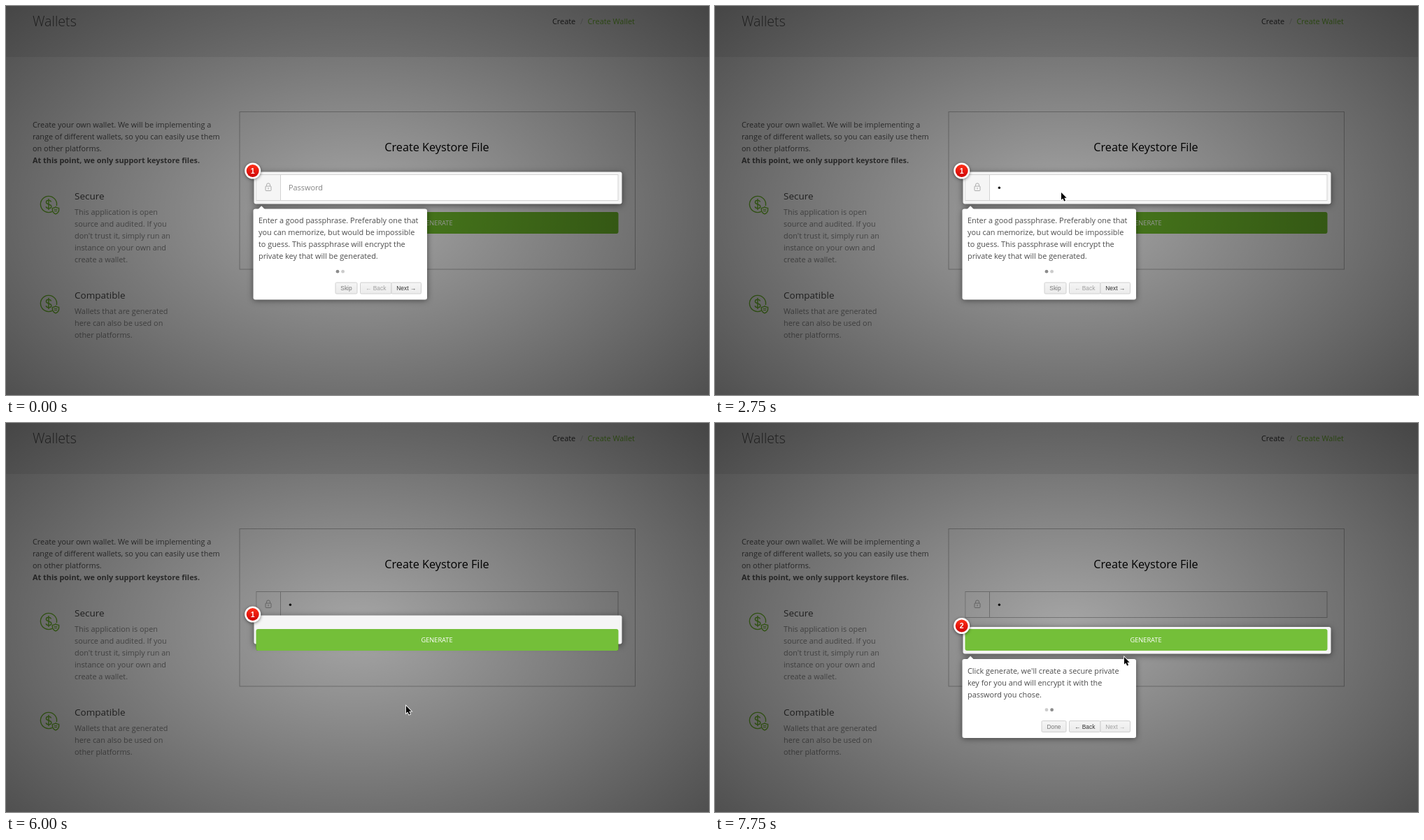
Recreate the animation shown at these times as an HTML page. Size 1005 px wide and 557 px high, loop 8000 ms.

```html
<!DOCTYPE html>
<html lang="en">
<head>
<meta charset="utf-8">
<title>Create Wallet</title>
<style>
  html, body { margin: 0; width: 100%; height: 100%; overflow: hidden; background: #777; }
  svg { display: block; width: 1005px; height: 557px; font-family: "Open Sans", "Noto Sans", sans-serif; }
  .ui { font-family: "Liberation Sans", Arial, sans-serif; }
  .menu { font-family: Inter, Roboto, sans-serif; }
  .glow { filter: drop-shadow(0 2px 5px rgba(0,0,0,.5)); }
  .tip { filter: drop-shadow(0 1px 4px rgba(0,0,0,.5)); }
  .badge { filter: drop-shadow(0 1px 2px rgba(0,0,0,.5)); }
</style>
</head>
<body>
<svg id="stage" viewBox="0 0 1005 557" xmlns="http://www.w3.org/2000/svg"></svg>
<script>
const BODY = 10.88;
const GREEN = '#72c02c';
const stage = document.getElementById('stage');

const text = (x, y, str, size, fill, attrs = '') =>
  `<text x="${x}" y="${y}" font-size="${size}" fill="${fill}" ${attrs}>${str}</text>`;

const lines = (x, y, rows, fill) =>
  rows.map((row, i) => text(x, y + i * 17, row, BODY, fill)).join('');

const rect = (x, y, w, h, fill, attrs = '') =>
  `<rect x="${x}" y="${y}" width="${w}" height="${h}" fill="${fill}" ${attrs}/>`;

const coin = y => `
  <g transform="translate(61 ${y})" fill="none" stroke="${GREEN}" stroke-width="1.4">
    <path d="M5 10.4A11.6 11.6 0 1 1 11.4 2"/>
    <path d="M3.6-3.6C3-5.2 1.6-5.7 0-5.7C-2-5.7-3.6-4.7-3.6-3C-3.6.8 3.8-.8 3.8 2.9C3.8 4.7 2 5.7 0 5.7C-2 5.7-3.4 5-3.9 3.3M0-8V8"/>
    <path d="M5.4 5.4Q8.2 5.4 10 3.8Q11.8 5.4 14.6 5.4V8.6Q14.2 12 10 13.8Q5.8 12 5.4 8.6Z"/>
    <path d="M7.6 7.4H12.4M7.9 9.6H12.1" stroke-width="1"/>
  </g>`;

const field = (border, fill) => `
  ${rect(358, 241.5, 517, 37, '#fff', `stroke="${border}"`)}
  ${rect(358.5, 242, 34, 36, fill)}
  <path d="M392.5 242V278" stroke="${border}"/>
  <g fill="none" stroke="#aaa">
    <path d="M372.5 258V256.3A2.5 2.5 0 0 1 377.5 256.3V258"/>
    <rect x="371" y="258" width="8" height="6.5" rx=".8"/>
    <path d="M375 260V262.5"/>
  </g>
  <g class="hint">${text(404, 264, 'Password', BODY, '#858585')}</g>
  <circle class="dot" cx="406.4" cy="260.3" r="1.7" fill="#111"/>`;

const button = cls => `
  ${rect(357.5, 295, 518, 31, GREEN, `rx="3" class="${cls}"`)}
  ${text(616, 313.6, 'GENERATE', 9.25, '#fff', 'text-anchor="middle"')}`;

const control = (x, y, w, label, fill, id = '') =>
  rect(x, y, w, 16, 'url(#btn)', `stroke="#d0d0d0" rx="1.5" ${id && `id="${id}-box"`}`) +
  text(x + w / 2, y + 11, label, 8.4, fill, `class="ui" text-anchor="middle" ${id && `id="${id}"`}`);

const page = `
  ${rect(0, 0, 1005, 557, '#fff')}
  ${rect(0, 0, 1005, 73, '#ececec')}
  ${text(38, 29, 'Wallets', 19.6, '#555', 'font-weight="300"')}
  ${text(781, 25.5, 'Create', BODY, '#333')}
  ${text(821, 25.5, '/', BODY, '#bbb')}
  ${text(831.5, 25.5, 'Create Wallet', BODY, GREEN)}
  ${lines(38, 174, ['Create your own wallet. We will be implementing a',
    'range of different wallets, so you can easily use them', 'on other platforms.'], '#555')}
  ${text(38, 225, 'At this point, we only support keystore files.', BODY, '#555', 'font-weight="700"')}
  ${coin(284)}
  ${text(98, 277, 'Secure', 13.5, '#444')}
  ${lines(98, 299, ['This application is open', 'source and audited. If you', 'don\'t trust it, simply run an',
    'instance on your own and', 'create a wallet.'], '#888')}
  ${coin(426)}
  ${text(98, 419, 'Compatible', 13.5, '#444')}
  ${lines(98, 441, ['Wallets that are generated', 'here can also be used on', 'other platforms.'], '#888')}
  ${rect(334, 151.5, 565.5, 225.5, 'none', 'stroke="#bbb"')}
  ${text(616, 207.5, 'Create Keystore File', 16.25, '#000', 'text-anchor="middle"')}
  ${field('#b8b8b8', '#fff')}
  ${button('')}`;

const tooltip = (id, top, height, rows, step, controls) => {
  const dot = i => `<circle cx="${474 + i * 7.6}" cy="${top + height - 40.3}" r="2.4" fill="${i === step ? '#8c8c8c' : '#ccc'}"/>`;
  return `<g id="${id}">
    <g class="tip">
      ${rect(353.5, top, 248.5, height, '#fff', 'rx="3"')}
      <path d="M360.5 ${top + .5}l4.7-4.7 4.7 4.7z" fill="#fff"/>
    </g>
    ${lines(361, top + 20.5, rows, '#4c4c4c')}
    ${dot(0)}${dot(1)}${controls(top + height - 24.5)}
  </g>`;
};

stage.innerHTML = `
  <defs>
    <radialGradient id="shade" gradientUnits="userSpaceOnUse" cx="0" cy="0" r="1"
      gradientTransform="translate(502 295) scale(715 450)">
      <stop offset="0" stop-opacity=".35"/><stop offset="1" stop-opacity=".72"/>
    </radialGradient>
    <linearGradient id="btn" x2="0" y2="1">
      <stop stop-color="#f5f5f5"/><stop offset="1" stop-color="#ebebeb"/>
    </linearGradient>
    <linearGradient id="red" x2="0" y2="1">
      <stop stop-color="#ff3019"/><stop offset="1" stop-color="#cf0404"/>
    </linearGradient>
  </defs>
  ${page}
  ${rect(0, 0, 1005, 557, 'url(#shade)')}
  <g class="glow">${rect(354.5, 237.5, 526, 46, '#f5f5f5', 'id="focus" rx="3"')}</g>
  <g id="liveField">${field('#d2d2d2', '#f5f5f5')}</g>
  <g id="liveButton">${button('hot')}</g>
  ${tooltip('tip1', 290.5, 130, ['Enter a good passphrase. Preferably one that', 'you can memorize, but would be impossible',
    'to guess. This passphrase will encrypt the', 'private key that will be generated.'], 0, y =>
    control(471, y, 31, 'Skip', '#777') + control(506.5, y, 44.5, '← Back', '#a0a0a0') +
    control(551, y, 42.5, 'Next →', '#333', 'next'))}
  ${tooltip('tip2', 338, 113, ['Click generate, we\'ll create a secure private', 'key for you and will encrypt it with the',
    'password you chose.'], 1, y =>
    control(467, y, 35, 'Done', '#777', 'done') + control(506.5, y, 44.5, '← Back', '#333') +
    control(551, y, 42.5, 'Next →', '#a0a0a0'))}
  <g id="badge" class="badge">
    <circle r="11.5" fill="#fff"/><circle r="9" fill="url(#red)"/>
    ${text(0, 3.8, '1', 10.5, '#fff', 'id="step" class="ui" font-weight="700" text-anchor="middle"')}
  </g>
  <g id="menu" class="menu">
    ${rect(392, 279.5, 483, 56, '#fff', 'stroke="#a9bfd0"')}
    ${['Use password for:', 'KRD517', 'BN846'].map((s, i) => text(398.5, 293.3 + i * 18.5, s, 9.9, '#000')).join('')}
  </g>
  <path id="caret" stroke="#000" d="M0 253V267"/>
  <path id="cursor" d="M0 0V10.6L2.4 8.4L4.1 12.6L6 11.8L4.3 7.8H7.6Z" fill="#000" stroke="#fff" stroke-width="1.6" paint-order="stroke"/>`;

// Pointer stops: time, x, y
const stops = [
  [250, 448, 26], [500, 493, 237], [750, 495, 267], [3250, 515, 277], [3500, 531, 290],
  [3750, 541, 297], [4000, 575, 321], [4250, 576, 321], [4500, 622, 327], [4750, 626, 328],
  [5000, 591, 380], [5250, 570, 406], [6000, 572, 405], [6250, 572, 428], [6500, 584, 311],
  [6750, 586, 310], [7250, 586, 311], [7500, 586, 322], [7750, 585, 335]
];

const $ = id => document.getElementById(id);
const set = (el, name, value) => el.setAttribute(name, value);
const show = (el, on) => set(el, 'visibility', on ? 'visible' : 'hidden');
const all = (sel, fn) => stage.querySelectorAll(sel).forEach(fn);

function draw(t) {
  const clicked = t >= 1750, typed = t >= 2250, moving = t >= 6000, second = t >= 6250;
  const hover = t >= 6500 && t < 7500;

  const top = second ? 292 : moving ? 275.5 : 237.5;
  set($('focus'), 'y', top);
  set($('focus'), 'height', second ? 38.5 : moving ? 41 : 46);
  set($('badge'), 'transform', `translate(352.7 ${top - 1.5})`);
  $('step').textContent = second ? 2 : 1;

  // Only display hides nested visible children
  set($('liveField'), 'display', moving ? 'none' : 'inline');
  show($('liveButton'), moving);
  show($('tip1'), !moving);
  show($('tip2'), second);
  set($('tip2'), 'opacity', t < 6500 ? .6 : 1);
  all('.hot', el => set(el, 'fill', hover ? '#8ed24f' : '#74bf39'));
  all('.hint', el => show(el, !typed));
  all('.dot', el => show(el, typed));

  const pressing = t >= 5250 && !moving;
  set($('next-box'), 'stroke', pressing ? '#a8a8a8' : '#d0d0d0');
  set($('done'), 'fill', t < 7250 ? GREEN : '#777');

  show($('menu'), clicked && !typed);
  const blinkOn = Math.floor((t - 2250) / 500) % 2 === 0;
  show($('caret'), clicked && !moving && (!typed || blinkOn));
  set($('caret'), 'transform', `translate(${typed ? 409.5 : 405} 0)`);

  const stop = stops.filter(s => s[0] <= t).pop();
  show($('cursor'), !!stop);
  if (stop) set($('cursor'), 'transform', `translate(${stop[1]} ${stop[2]})`);
}

const start = performance.now();
function tick() {
  draw((performance.now() - start) % 8000);
  requestAnimationFrame(tick);
}
tick();
</script>
</body>
</html>
```
